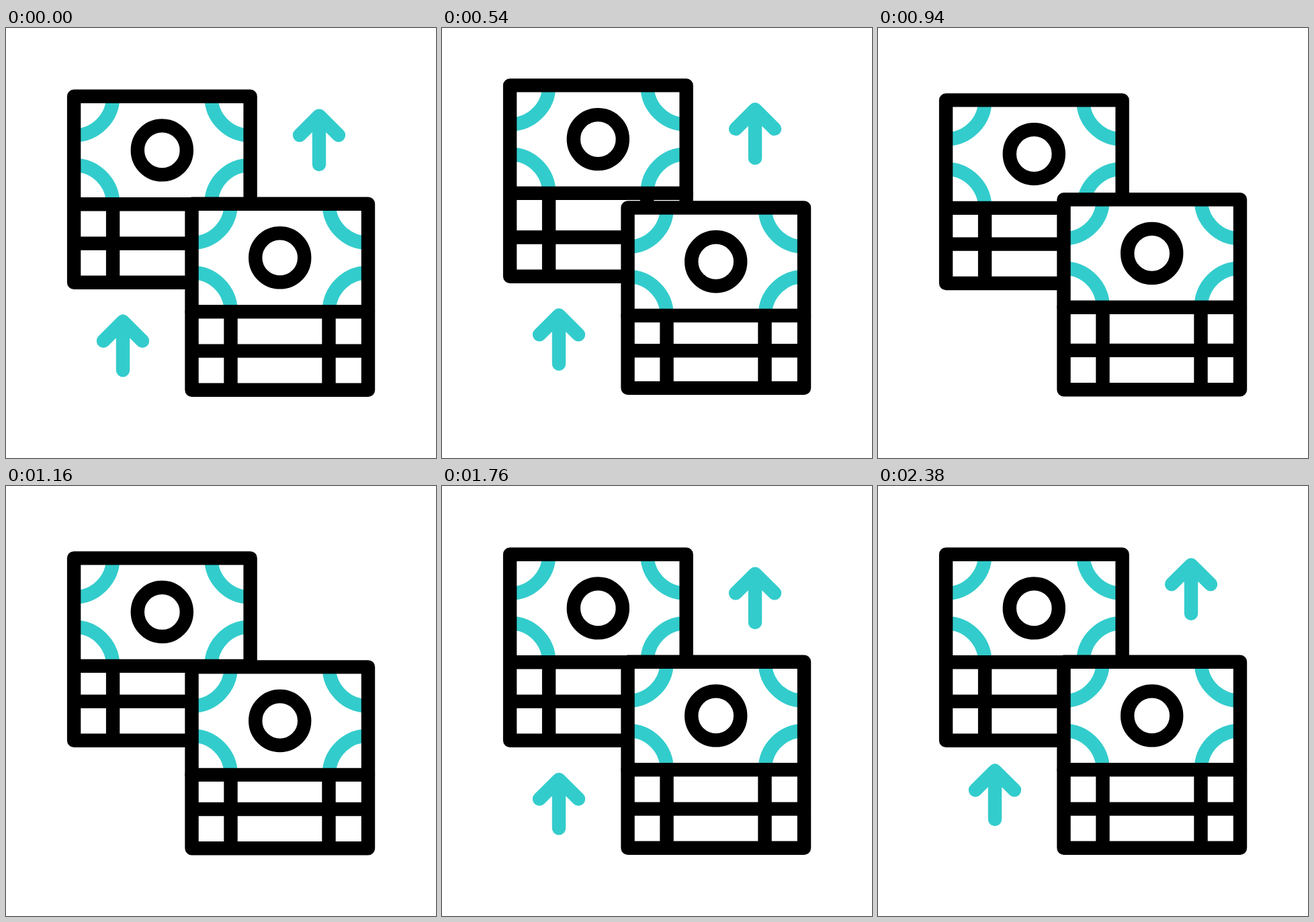
Recreate the animation shown at these times as an HTML page. Size 640 by 640 pixels, loop 2.4 s.

```html
<!DOCTYPE html>
<html lang="en">
<head>
<meta charset="utf-8">
<title>Money stacks</title>
<style>
  html, body { margin: 0; width: 100%; height: 100%; overflow: hidden; background: #fff; }
  svg { display: block; width: 100%; height: 100%; }
  path, circle { fill: none; stroke: #000; stroke-width: 20.4; stroke-linecap: round; stroke-linejoin: round; }
  .paper { fill: #fff; }
  .teal { stroke: #3cc; }
</style>
</head>
<body>
<svg viewBox="0 0 640 640">
  <defs>
    <clipPath id="inside"><path d="M0 0H262.5V160.5H0Z"/></clipPath>
    <g id="note">
      <path class="paper" style="stroke:none" d="M0 0H262.5V160.5H0Z"/>
      <g clip-path="url(#inside)">
        <circle class="teal" r="58.2"/>
        <circle class="teal" r="58.2" cx="262.5"/>
        <circle class="teal" r="58.2" cy="160.5"/>
        <circle class="teal" r="58.2" cx="262.5" cy="160.5"/>
      </g>
      <path d="M0 0H262.5V160.5H0Z"/>
      <circle cx="131.2" cy="80.2" r="36.5"/>
    </g>
    <path id="arrow" class="teal" d="M466 203V130.6M437 159.5L466 130.6L495 159.5"/>
  </defs>
  <g id="arrows">
    <use href="#arrow"/>
    <use href="#arrow" x="-292" y="306.2"/>
  </g>
  <g class="stack" transform="translate(101.1 101.7)"><path class="paper"/><use href="#note"/></g>
  <g class="stack" transform="translate(276.5 261.7)"><path class="paper"/><use href="#note"/></g>
</svg>
<script>
const LOOP = 2400, LAG = 100, ARROW_CYCLE = 1770;

// Each hop: start, dip, peak, rebound, rest
const noteTimes = [80, 350, 640, 1000, 1440];
const bandTimes = [0, 245, 605, 920, 1160];

const clamp = v => Math.min(1, Math.max(0, v));
const ease = u => (1 - Math.cos(Math.PI * clamp(u))) / 2;

// Sine-eased swing from rest through dip, peak and rebound, back to rest
function hop(t, times, dip, peak, rebound) {
  const stops = [0, dip, peak, rebound, 0];
  let y = 0;
  for (let i = 1; i < stops.length; i++) {
    const u = (t - times[i - 1]) / (times[i] - times[i - 1]);
    y += (stops[i] - stops[i - 1]) * ease(u);
  }
  return y;
}

const stacks = [...document.querySelectorAll('.stack')].map(g => ({
  bands: g.querySelector('path'),
  note: g.querySelector('use')
}));
const arrows = document.getElementById('arrows');

function drawStack({ bands, note }, t) {
  const lift = hop(t, noteTimes, 15.5, -27.5, 8);
  const top = 160.5 + lift;
  const mid = 218.9 + hop(t, bandTimes, 13.8, -11, 1);
  const base = 277.1 + hop(t, bandTimes, 6.8, -10.3, 1.2);
  note.setAttribute('y', lift);
  bands.setAttribute('d',
    `M0 ${top}V${base}H262.5V${top}M58 ${top}V${base}M204 ${top}V${base}M0 ${mid}H262.5`);
}

// Arrows drift slowly through their home place, then speed away and fade
function drawArrows(t) {
  let c = t % ARROW_CYCLE;
  if (c > 1000) c -= ARROW_CYCLE;
  const u = c / 600;
  const alpha = Math.min(clamp((c + 560) / 130), clamp((770 - c) / 130));
  arrows.setAttribute('transform', `translate(0 ${-6.24 * (u + u ** 5)})`);
  arrows.setAttribute('opacity', alpha);
}

function frame(now) {
  const t = now % LOOP;
  stacks.forEach((s, i) => drawStack(s, t - i * LAG));
  drawArrows(t);
  requestAnimationFrame(frame);
}
frame(performance.now());
</script>
</body>
</html>
```
